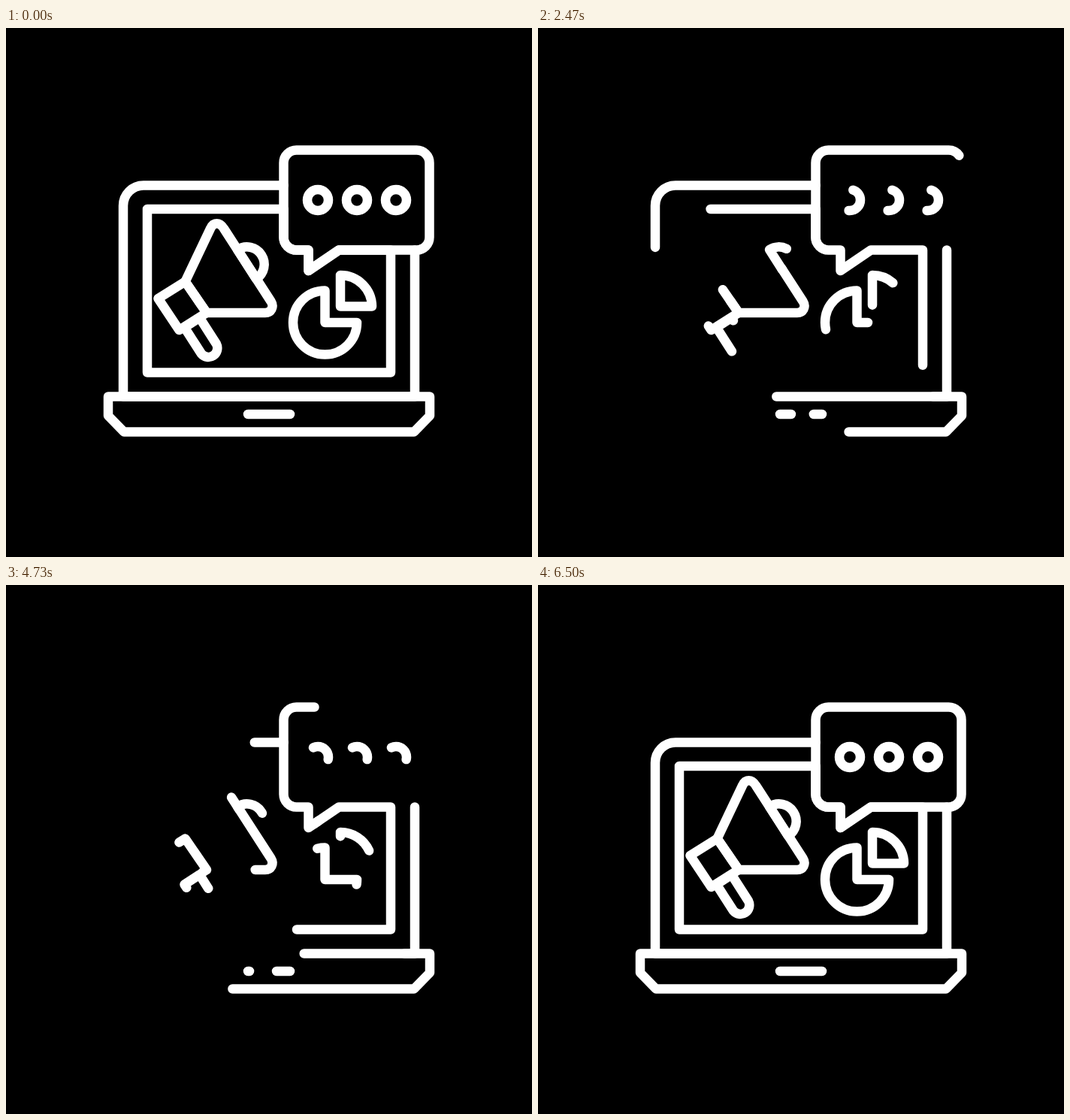
Write an HTML page that moves like this. It is 700x704 px and loops after 7010 ms.

```html
<!DOCTYPE html>
<html lang="en">
<head>
<meta charset="utf-8">
<title>Laptop marketing icon</title>
<style>
  html, body { margin: 0; height: 100%; overflow: hidden; background: #000; }
  svg { display: block; width: 100vw; height: 100vh; }
  #icon { fill: none; stroke: #fff; stroke-width: 12.5; stroke-linecap: round; stroke-linejoin: round; }
</style>
</head>
<body>
<svg viewBox="0 0 700 704">
  <g id="icon">
    <!-- speech bubble and dots -->
    <path d="M386.500 162.500H546.500A17 17 0 0 1 563.500 179.500V278.500A17 17 0 0 1 546.500 295.500H443L402.500 323V295.500H386.500A17 17 0 0 1 369.500 278.500V179.500A17 17 0 0 1 386.500 162.500Z"/>
    <circle cx="415" cy="229" r="14"/>
    <circle cx="467" cy="229" r="14"/>
    <circle cx="519" cy="229" r="14"/>
    <!-- laptop: lid, screen, base, notch -->
    <path d="M369.500 209.500H183A27 27 0 0 0 156 236.500V490.500H544V295.500"/>
    <path d="M443 295.500L402.500 323V295.500H386.500A17 17 0 0 1 369.500 278.500V241H188V458.500H512V295.500Z"/>
    <path d="M564 490.500H136V516L157 537.500H543L564 516Z"/>
    <path d="M322 514H378"/>
    <!-- megaphone: cone, bell, box, handle -->
    <path d="M345 379H267L238.500 337.500L272 267C276 258 284.500 258 290 267L352.700 364C357 371 353 379 345 379Z"/>
    <path d="M308 295L333 334A23.160 23.160 0 0 0 308 295Z"/>
    <path d="M267 379L230.500 402L202.500 360L238.500 337.500Z"/>
    <path d="M237.500 398.500L260 433.500A12 12 0 0 0 280 420.500L257.500 385.500Z"/>
    <!-- pie chart -->
    <path d="M424.500 349.500A42.500 42.500 0 1 0 467 392H424.500Z"/>
    <path d="M445 329V370.500H487A42 42 0 0 0 445 329Z"/>
  </g>
</svg>
<script>
  const LOOP = 7010, HOLD = 1, SPAN = 5.5, FPS = 30;
  const icon = document.getElementById('icon');
  for (const shape of icon.children) shape.setAttribute('pathLength', 100);

  // Two points run along every outline, one three times as fast; they swap roles halfway.
  function draw(ms) {
    const seconds = Math.floor((ms % LOOP + 4) * FPS / 1000) / FPS;
    const u = Math.min(1, Math.max(0, (seconds - HOLD) / SPAN));
    const start = Math.min(3 * u, 1 + u);
    const length = Math.max(3 * u, 1 + u) - start;
    icon.style.strokeDasharray = length >= 1 ? 'none' : `${100 * length} ${100 * (1 - length)}`;
    icon.style.strokeDashoffset = -100 * (start % 1);
  }

  const begin = performance.now();
  function tick() {
    draw(performance.now() - begin);
    requestAnimationFrame(tick);
  }
  tick();
</script>
</body>
</html>
```
